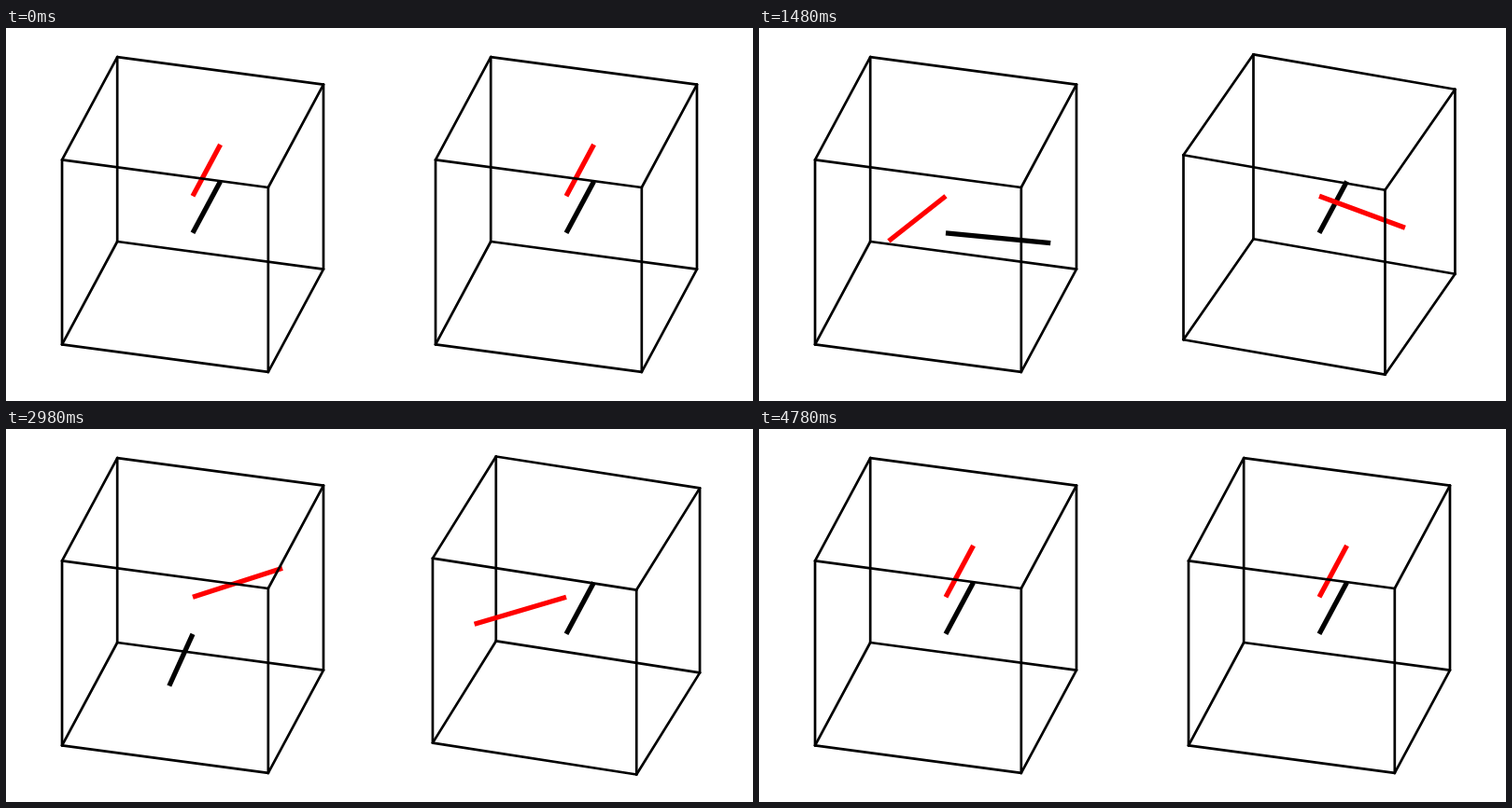
An HTML page with a canvas for the animation above (4.8 s loop, 800 by 400 pixels).

```html
<!DOCTYPE html>
<html lang="en">
<head>
<meta charset="utf-8">
<title>Relative rotation</title>
<style>
  html, body { margin: 0; width: 100%; height: 100%; overflow: hidden; background: #fff; }
  canvas { display: block; }
</style>
</head>
<body>
<canvas id="stage" width="800" height="400"></canvas>
<script>
const ctx = document.getElementById('stage').getContext('2d');
const UNIT = 400 / 3.5;
const TILT = Math.PI / 6;
const HEADING = Math.PI / 12;
const STEP_MS = 20;
const STEPS = 240;

// Orthographic view of a point in cylindrical coordinates, angle clockwise from the back.
function project(cx, radius, angle, z) {
  const a = angle + HEADING;
  const x = radius * Math.sin(a);
  const y = -radius * Math.cos(a);
  return [cx + UNIT * x, 200 + UNIT * (y * Math.sin(TILT) - z * Math.cos(TILT))];
}

function line(from, to, color, width, cap) {
  ctx.strokeStyle = color;
  ctx.lineWidth = width;
  ctx.lineCap = cap;
  ctx.beginPath();
  ctx.moveTo(...from);
  ctx.lineTo(...to);
  ctx.stroke();
}

function rod(cx, angle, z, color) {
  line(project(cx, 0, 0, z), project(cx, 1, angle, z), color, 5.3, 'butt');
}

function cubeEdges(cx, turn) {
  const corners = z => [0, 1, 2, 3].map(k =>
    project(cx, Math.SQRT2, turn + Math.PI / 4 + k * Math.PI / 2, z));
  const top = corners(1);
  const bottom = corners(-1);
  const heights = bottom.map(p => p[1]);
  const far = heights.indexOf(Math.min(...heights));
  const hidden = [], visible = [];
  for (let k = 0; k < 4; k++) {
    const next = (k + 1) % 4;
    visible.push([top[k], top[next]]);
    (k === far ? hidden : visible).push([top[k], bottom[k]]);
    (k === far || next === far ? hidden : visible).push([bottom[k], bottom[next]]);
  }
  return { hidden, visible };
}

function panel(cx, cubeTurn, blackTurn, redTurn) {
  const { hidden, visible } = cubeEdges(cx, cubeTurn);
  const edge = ([from, to]) => line(from, to, '#000', 2.7, 'round');
  hidden.forEach(edge);
  rod(cx, blackTurn, -0.2, '#000');
  rod(cx, redTurn, 0.2, '#f00');
  visible.forEach(edge);
}

function draw() {
  const step = Math.floor(performance.now() / STEP_MS) % STEPS;
  const turn = 2 * Math.PI * step / (STEPS - 1);
  ctx.fillStyle = '#fff';
  ctx.fillRect(0, 0, 800, 400);
  panel(200, 0, 4 * turn, 5 * turn);
  panel(600, -4 * turn, 0, turn); // seen from the black rod's frame
  requestAnimationFrame(draw);
}
draw();
</script>
</body>
</html>
```
